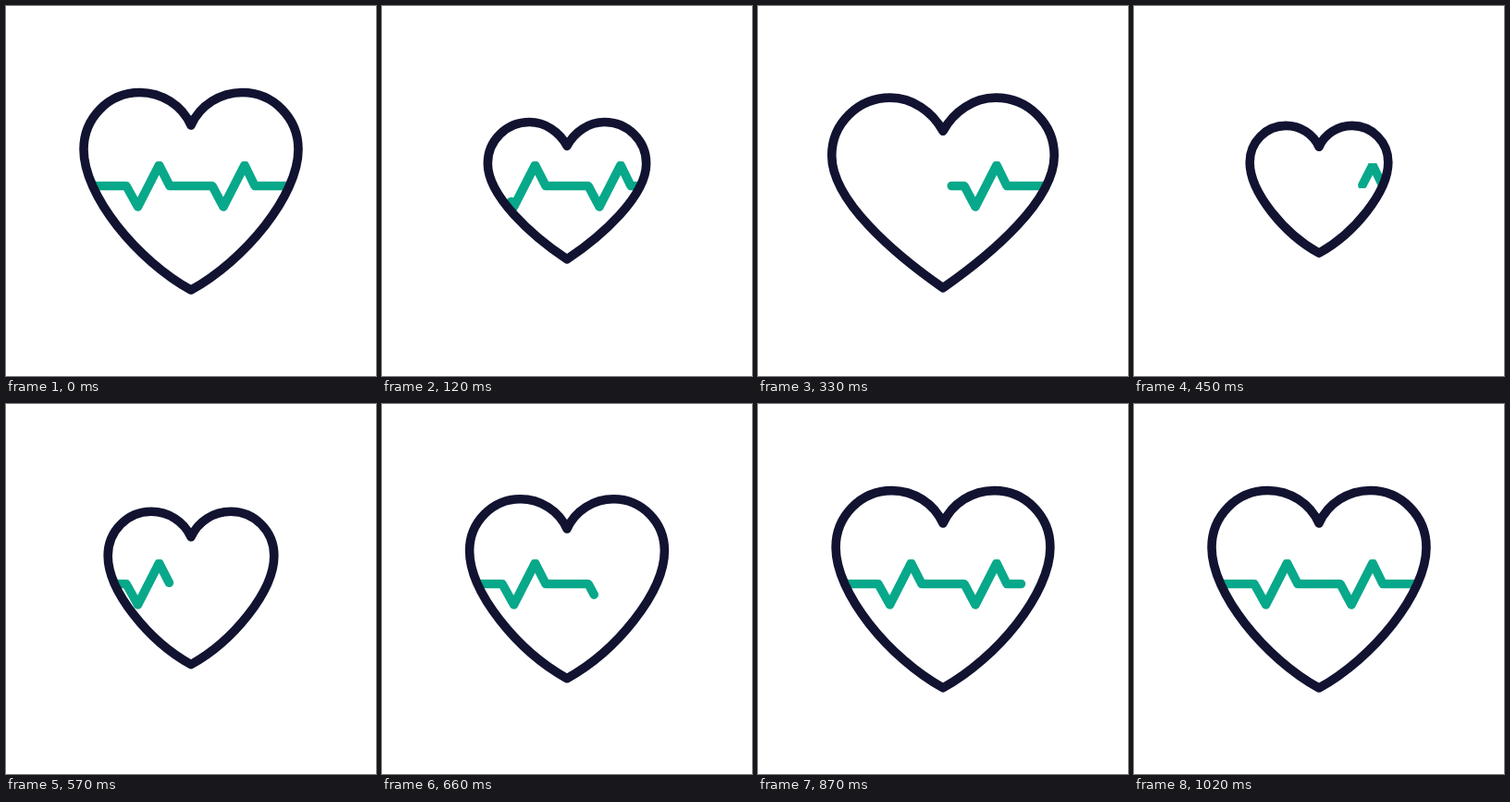
These frames come from a looping animation (400 by 400 pixels, 1.29 s). An HTML page:

```html
<!DOCTYPE html>
<html lang="en">
<head>
<meta charset="utf-8">
<title>Heartbeat</title>
<style>
  html, body { margin: 0; width: 100%; height: 100%; overflow: hidden; background: #fff; }
  svg { display: block; width: 100vw; height: 100vh; }
  path { fill: none; stroke-width: 9.6; stroke-linecap: round; stroke-linejoin: round; }
  .pulse { stroke: #08a88a; }
  #heart { stroke: #121331; }
  #inside { fill: #fff; }
</style>
</head>
<body>
<svg viewBox="0 0 400 400">
  <mask id="clip" maskContentUnits="userSpaceOnUse"><path id="inside"/></mask>
  <path id="leaving" class="pulse" mask="url(#clip)"/>
  <path id="entering" class="pulse" mask="url(#clip)"/>
  <path id="heart"/>
</svg>
<script>
const STEP = 30, STEPS = 43;
const CENTER = [200, 194.6];
const BASE = 194.5, LOW = 217, HIGH = 172;
const PULSE = [
  [84, BASE], [130, BASE], [142.5, LOW], [165.5, HIGH], [177, BASE],
  [223, BASE], [235, LOW], [258, HIGH], [269, BASE], [316, BASE]
];
const dist = (a, b) => Math.hypot(b[0] - a[0], b[1] - a[1]);
const LENGTH = PULSE.slice(1).reduce((sum, p, i) => sum + dist(PULSE[i], p), 0);

const $ = id => document.getElementById(id);
const clamp = u => Math.min(1, Math.max(0, u));

function bezier(x1, y1, x2, y2) {
  const at = (a, b, t) => 3 * a * t * (1 - t) ** 2 + 3 * b * t * t * (1 - t) + t ** 3;
  return u => {
    let lo = 0, hi = 1;
    for (let i = 0; i < 30; i++) {
      const mid = (lo + hi) / 2;
      if (at(x1, x2, mid) < u) lo = mid; else hi = mid;
    }
    return at(y1, y2, (lo + hi) / 2);
  };
}

const smooth = bezier(0.333, 0, 0.667, 1);
const squeeze = bezier(0.5, 0, 0.75, 1);
const recover = bezier(0.36, 0.2, 0.28, 1);

// Each key: [step, value, easing used to arrive there]
const SCALE = [[0, 1], [5, 0.645, squeeze], [10, 1, smooth], [15, 0.645, squeeze], [30, 1, recover]];
const SPREAD = [[0, 0], [9, 1, smooth], [13, 0, smooth]];

function track(keys, n) {
  for (let i = 1; i < keys.length; i++) {
    const [a, from] = keys[i - 1], [b, to, ease] = keys[i];
    if (n <= b) return from + (to - from) * ease((n - a) / (b - a));
  }
  return keys[keys.length - 1][1];
}

// s scales the heart, m widens and flattens it
function heartPath(s, m) {
  const w = 116 * (1 + 0.115 * m);
  const notch = -65.6 * (1 - 0.155 * m);
  const top = -101.1 * (1 - 0.074 * m);
  const peak = 55.5 + 5 * m;
  const side = -39.6 + 12 * m;
  const tip = 112.4;
  const k = 0.5523;
  const half = [
    [0, notch],
    [9.8 + 4 * m, notch - 21.8], [peak - 23.9, top], [peak, top],
    [peak + k * (w - peak), top], [w, side - k * (side - top)], [w, side],
    [w, side + 50], [58 - 10 * m, tip - 32 - 10 * m], [0, tip]
  ];
  const place = dir => ([x, y]) =>
    (CENTER[0] + dir * x * s).toFixed(2) + "," + (CENTER[1] + y * s).toFixed(2);
  const right = half.map(place(1));
  const left = half.map(place(-1)).reverse();
  return `M${right[0]}C${right.slice(1).join(" ")} ${left.slice(1).join(" ")}Z`;
}

// Part of the pulse between two lengths; a purely flat part stays hidden
function pulsePath(from, to) {
  const pts = [];
  let pos = 0;
  for (let i = 1; i < PULSE.length; i++) {
    const a = PULSE[i - 1], b = PULSE[i], len = dist(a, b);
    const u = Math.max(0, (from - pos) / len), v = Math.min(1, (to - pos) / len);
    if (u < v) {
      const mix = t => [a[0] + (b[0] - a[0]) * t, a[1] + (b[1] - a[1]) * t];
      if (!pts.length) pts.push(mix(u));
      pts.push(mix(v));
    }
    pos += len;
  }
  if (pts.every(p => Math.abs(p[1] - BASE) < 0.01)) return "";
  return "M" + pts.map(p => p.map(c => c.toFixed(2)).join()).join("L");
}

function draw(time) {
  const n = Math.floor(time / STEP) % STEPS;
  const d = heartPath(track(SCALE, n), track(SPREAD, n));
  $("heart").setAttribute("d", d);
  $("inside").setAttribute("d", d);
  $("leaving").setAttribute("d", pulsePath(16.35 * n, LENGTH));
  const drawn = 1 - (1 - clamp((n - 13) / 21)) ** 1.66;
  $("entering").setAttribute("d", pulsePath(0, LENGTH * drawn));
}

const start = performance.now();
function tick() {
  draw(performance.now() - start);
  requestAnimationFrame(tick);
}
tick();
</script>
</body>
</html>
```
